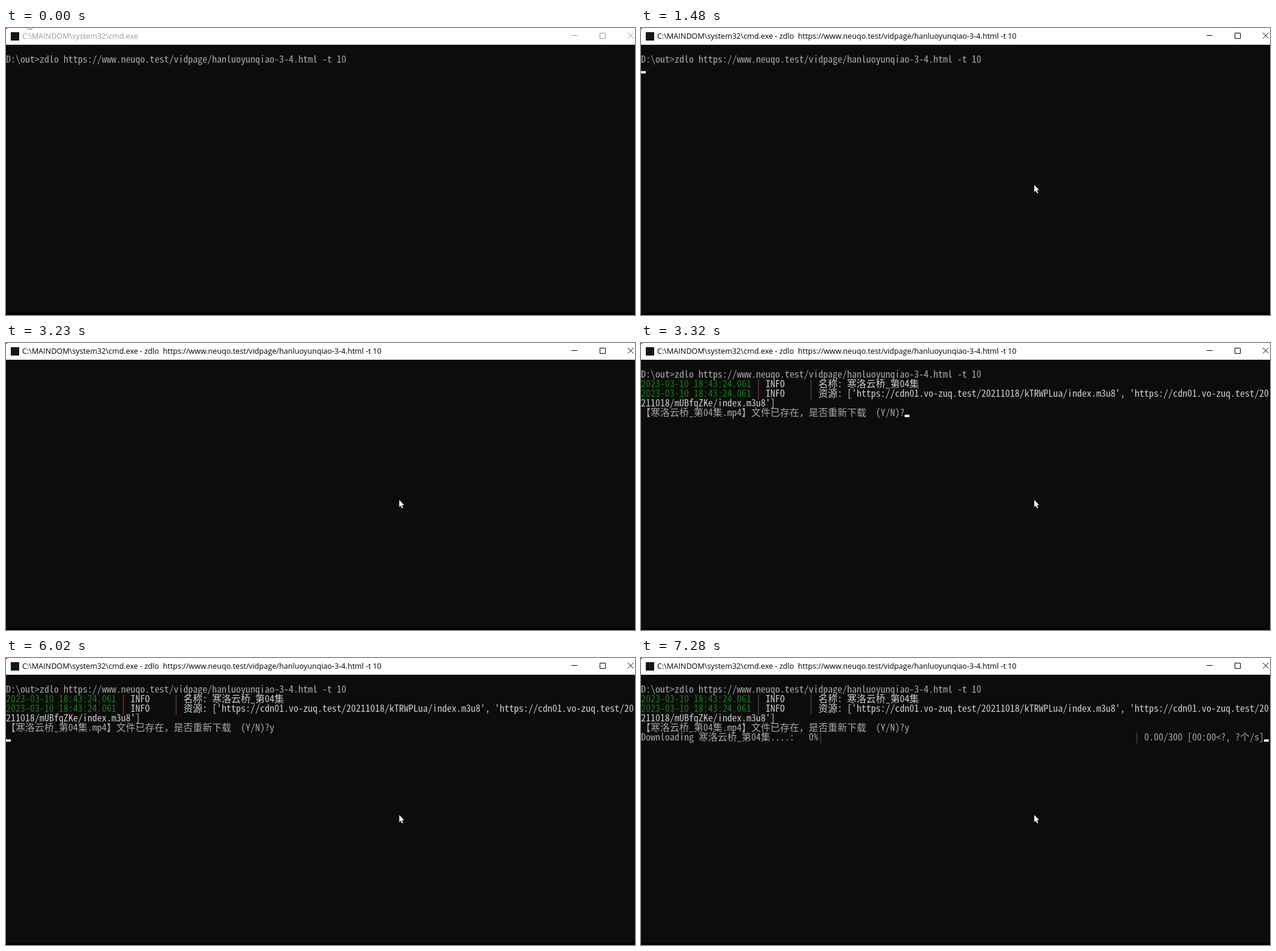
Animation, 1050 px wide and 480 px high, one loop 8000 ms. Source, as an HTML page with a canvas:

```html
<!DOCTYPE html>
<html lang="zh">
<head>
<meta charset="utf-8">
<title>Console</title>
<style>
html, body { margin: 0; width: 100%; height: 100%; overflow: hidden; background: #0c0c0c; }
canvas { display: block; }
</style>
</head>
<body>
<canvas id="stage" width="1050" height="480"></canvas>
<script>
const ctx = document.getElementById('stage').getContext('2d');
const LOOP = 8000, CELL = 8, ROW = 16, TOP = 28;
const GREY = '#a9a9a9', WHITE = '#cdcdcd', GREEN = '#12800e', BAR = '#85503a';

const page = 'https://www.neuqo.test/vidpage/hanluoyunqiao-3-4.html -t 10';
const shell = 'C:\\MAINDOM\\system32\\cmd.exe';
const episode = '寒洛云桥_第04集';
const stamp = '2023-03-10 18:43:24.061';
const clip = id => `https://cdn01.vo-zuq.test/20211018/${id}/index.m3u8`;
const sources = `资源: ['${clip('kTRWPLua')}', '${clip('mUBfqZKe')}']`;
const WRAP = sources.indexOf('211018/mUBf');

// Cursor: [start, end, column, row]
const cursorSpans = [
  [900, 1390, 71, 1], [1390, 1860, 0, 2], [2380, 2920, 0, 2],
  [3320, 3960, 55, 5], [4500, 4900, 55, 5], [4900, 4990, 56, 5],
  [5460, 5570, 0, 6], [6020, 6540, 0, 6], [7060, 7280, 0, 6], [7280, 8000, 130, 6]
];

function rect(x, y, w, h, color) {
  ctx.fillStyle = color;
  ctx.fillRect(x, y, w, h);
}

// Wide characters take two cells, all others one.
function print(text, col, row, color = GREY) {
  ctx.font = '16px "Noto Sans Mono CJK SC", "Noto Sans CJK SC", "Noto Sans Mono", monospace';
  for (const ch of text) {
    ctx.fillStyle = ch === '|' ? BAR : color;
    ctx.fillText(ch, col * CELL, TOP + row * ROW + 14);
    col += ch > '\u2fff' ? 2 : 1;
  }
}

function logLine(message, row) {
  print(stamp, 0, row, GREEN);
  print('| INFO     |', 24, row, WHITE);
  print(message, 37, row, WHITE);
}

function titleBar(t) {
  const ink = t < 90 ? '#999' : '#000';
  rect(0, 0, 1050, TOP, '#fff');
  rect(8, 7, 14, 14, '#161616');
  rect(0, 0, 2, 1, '#d22');
  rect(0, 1, 1, 1, '#d22');
  ctx.fillStyle = ink;
  ctx.font = '12.63px "Open Sans", "Noto Sans", sans-serif';
  ctx.fillText(shell + (t < 1480 ? '' : ` - zdlo  ${page}`), 27, 18);

  ctx.strokeStyle = ink;
  ctx.lineWidth = 1;
  ctx.beginPath();
  ctx.moveTo(944, 12.5); ctx.lineTo(954, 12.5);
  ctx.rect(991.5, 8.5, 9, 9);
  ctx.moveTo(1038, 8); ctx.lineTo(1047.5, 17.5);
  ctx.moveTo(1047.5, 8); ctx.lineTo(1038, 17.5);
  ctx.stroke();

  if (t < 90) {
    ctx.strokeStyle = '#555';
    ctx.beginPath();
    ctx.arc(40, -2.5, 5, 0, Math.PI);
    ctx.stroke();
  }
}

function pointer(x, y) {
  ctx.fillStyle = '#fff';
  ctx.beginPath();
  [[0, 0], [0, 12], [2.7, 9.5], [4.6, 14], [6.4, 13.2], [4.5, 9], [8, 8.5]]
    .forEach(([dx, dy]) => ctx.lineTo(x + dx, y + dy));
  ctx.fill();
}

function draw(t) {
  rect(0, 0, 1050, 480, '#0c0c0c');
  rect(0, 476, 1050, 4, '#000');
  titleBar(t);

  if (t < 3230 || t >= 3320) print(`D:\\out>zdlo ${page}`, 0, 1);
  if (t >= 3320) {
    logLine(`名称: ${episode}`, 2);
    logLine(sources.slice(0, WRAP), 3);
    print(sources.slice(WRAP), 0, 4, WHITE);
    print(`【${episode}.mp4】文件已存在，是否重新下载  (Y/N)?${t < 4900 ? '' : 'y'}`, 0, 5);
  }
  if (t >= 7280) {
    print(`Downloading ${episode}....:   0%|`, 0, 6);
    print('| 0.00/300 [00:00<?, ?个/s]', 103, 6);
  }

  for (const [from, to, col, row] of cursorSpans)
    if (t >= from && t < to) rect(col * CELL, TOP + row * ROW + 12, CELL, 4, '#f2f2f2');
  if (t >= 180) pointer(656.5, 262.5);
}

const start = performance.now();
function tick() {
  draw((performance.now() - start) % LOOP);
  requestAnimationFrame(tick);
}
tick();
</script>
</body>
</html>
```
